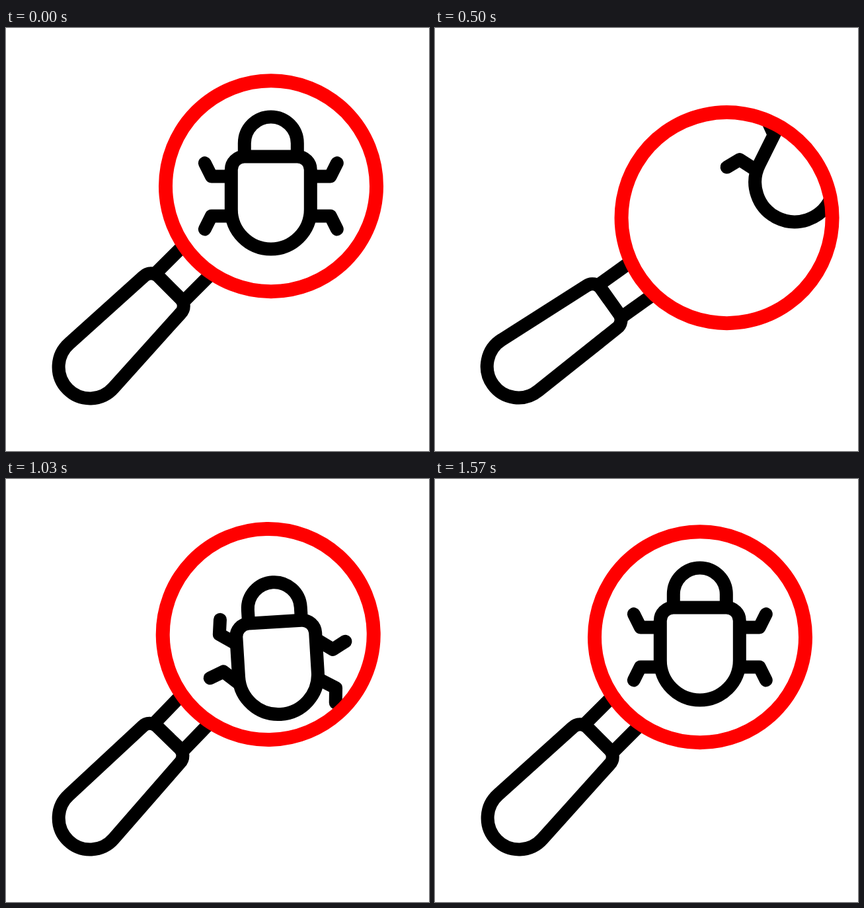
Recreate the animation shown at these times as an HTML page. Size 640 by 640 pixels, loop 1.67 s.

```html
<!DOCTYPE html>
<html lang="en">
<head>
<meta charset="utf-8">
<title>Bug search</title>
<style>
  html, body { margin: 0; width: 100%; height: 100%; overflow: hidden; background: #fff; }
  svg { display: block; width: 100vw; height: 100vh; }
  .ink { fill: none; stroke: #000; stroke-width: 20; }
  .leg { stroke-linecap: round; stroke-linejoin: round; }
</style>
</head>
<body>
<svg viewBox="0 0 640 640">
  <defs>
    <clipPath id="glass"><circle cx="401" cy="239.2" r="158"/></clipPath>
  </defs>
  <g id="magnifier">
    <g class="ink" transform="translate(127.5 512.5) rotate(-45)">
      <path d="M172 -30H231M172 30H231"/>
      <path d="M2.5 -47.4L154 -39.4A15.5 15.5 0 0 1 169.5 -24V24A15.5 15.5 0 0 1 154 39.4L2.5 47.4A47.5 47.5 0 1 1 2.5 -47.4Z"/>
    </g>
    <g clip-path="url(#glass)">
      <g id="bug" class="ink">
        <g id="legs"></g>
        <path d="M-40 -30V-50A40 40 0 0 1 40 -50V-30"/>
        <path fill="#fff" d="M-40 -30H40A20 20 0 0 1 60 -10V50A60 60 0 0 1 -60 50V-10A20 20 0 0 1 -40 -30Z"/>
      </g>
    </g>
    <circle cx="401" cy="239.2" r="159.5" fill="none" stroke="#f00" stroke-width="21"/>
  </g>
</svg>
<script>
const LOOP = 1670;
const FPS = 30;
const RETURN_AT = 23;
const SWING = [[0, 0], [12, 13.55], [RETURN_AT, -8.7], [33, 0]];

// Each leg lists the times at which it turns: rest, raised, rest, ...
const LEGS = [
  { x: -60, y: 0, tip: -20, lift: 39, turns: [0, 5, 10, 15, 20, 24, 28, 32, 36, 41, 47] },
  { x: 60, y: 0, tip: -20, lift: 42, turns: [2, 7.5, 13, 18, 24, 29.5, 35, 40, 46] },
  { x: -60, y: 60, tip: 20, lift: 41, turns: [2.7, 8.9, 17, 22, 28, 31, 34.4, 39.5, 45] },
  { x: 60, y: 60, tip: 20, lift: 43, turns: [5, 10, 15, 20, 25, 29.5, 33.8, 39, 44] }
];

const byId = id => document.getElementById(id);
const magnifier = byId('magnifier');
const bug = byId('bug');

for (const leg of LEGS) {
  const side = Math.sign(leg.x);
  leg.el = document.createElementNS('http://www.w3.org/2000/svg', 'path');
  leg.el.setAttribute('class', 'leg');
  leg.el.setAttribute('d', `M0 0H${30 * side}L${40 * side} ${leg.tip}`);
  leg.keys = leg.turns.map((t, i) => [t, i % 2 ? leg.lift : 0]);
  byId('legs').append(leg.el);
}

function ease(s) {
  s = Math.min(1, Math.max(0, s));
  return s * s * (3 - 2 * s);
}

function track(keys, f) {
  let value = keys[0][1];
  for (let i = 1; i < keys.length; i++) {
    const [t0, v0] = keys[i - 1];
    const [t1, v1] = keys[i];
    if (f > t0) value = v0 + (v1 - v0) * ease((f - t0) / (t1 - t0));
  }
  return value;
}

function bugPose(f) {
  if (f < RETURN_AT) {
    const gone = ease(f / 29);
    return { x: 204 * gone, y: -196 * gone, turn: 32.4 * gone };
  }
  const left = 1 - ease((f - RETURN_AT) / 10);
  return { x: 117 * left, y: 251 * left, turn: -25 * left };
}

function draw(ms) {
  const f = Math.floor((ms % LOOP + 4) * FPS / 1000);
  const { x, y, turn } = bugPose(f);
  magnifier.setAttribute('transform', `rotate(${track(SWING, f)} 132.5 507.5)`);
  bug.setAttribute('transform', `translate(${400.8 + x} ${224.4 + y}) rotate(${turn})`);
  for (const leg of LEGS) {
    leg.el.setAttribute('transform', `translate(${leg.x} ${leg.y}) rotate(${track(leg.keys, f)})`);
  }
}

const start = performance.now();
function tick(now) {
  draw(Math.max(0, now - start));
  requestAnimationFrame(tick);
}
draw(0);
requestAnimationFrame(tick);
</script>
</body>
</html>
```
